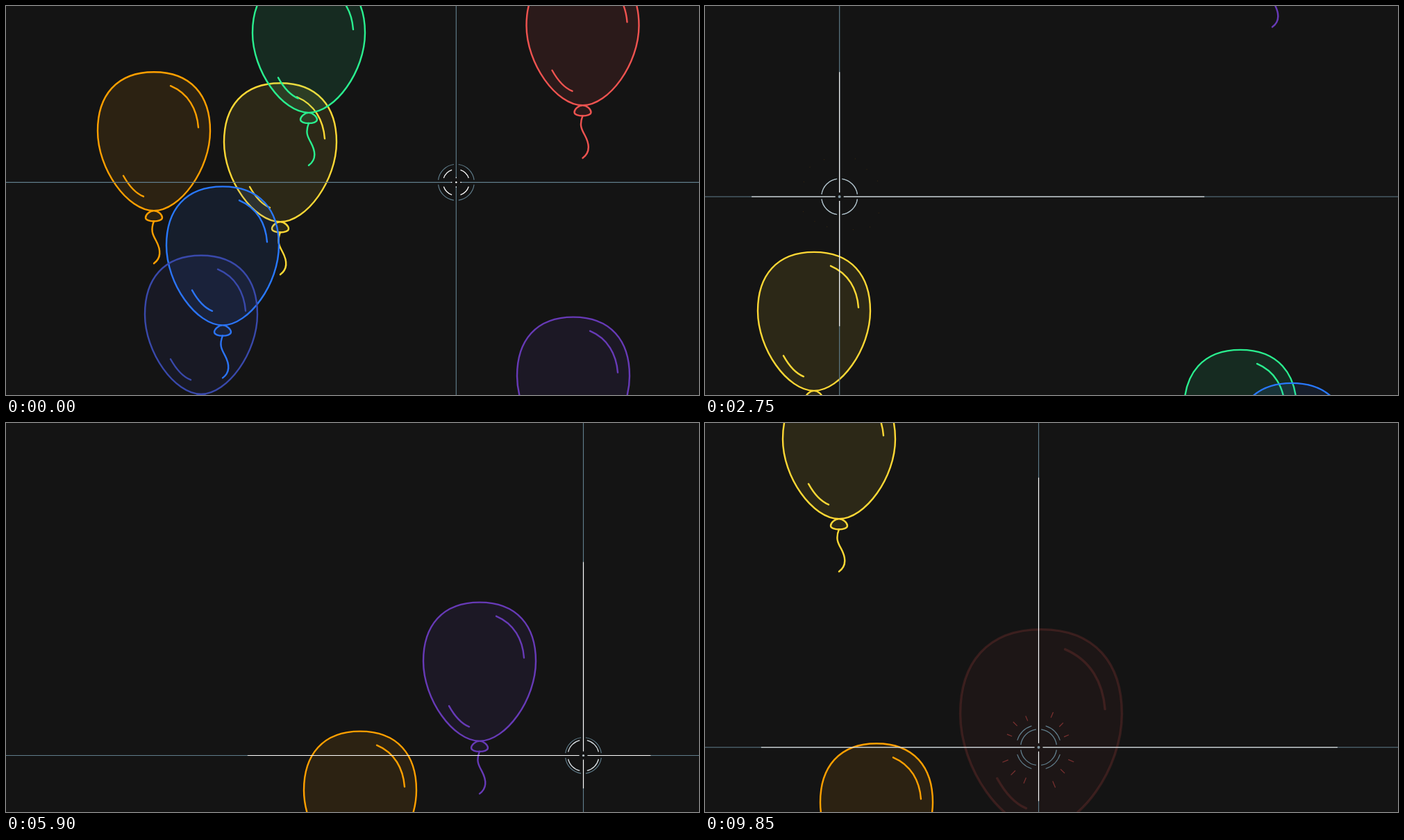
Recreate the animation shown at these times as an HTML page with a canvas. Size 998 by 561 pixels, loop 9920 ms.

```html
<!DOCTYPE html>
<html lang="en">
<head>
<meta charset="utf-8">
<title>Balloon range</title>
<style>
  html, body { margin: 0; width: 100%; height: 100%; overflow: hidden; background: #141414; }
  canvas { display: block; }
</style>
</head>
<body>
<canvas id="stage" width="998" height="561"></canvas>
<script>
const W = 998, H = 561, LOOP = 9.92, RISE = 175, SHOT_GAP = .5;
const ctx = document.getElementById('stage').getContext('2d');
const SLATE = [96, 125, 139], WHITE = [255, 255, 255];
const COLORS = ['#ef5350', '#ffa000', '#fdd835', '#2aef8f', '#2979ff', '#3949ab', '#673ab7'];

// Balloon origin: top centre of the body
const BODY = new Path2D('M0 0C54 0 81 34 81 85C81 140 38 200 0 200C-38 200-81 140-81 85C-81 34-54 0 0 0Z' +
  'M0 200C-6 200-12 206-12 210C-12 217 12 217 12 210C12 206 6 200 0 200Z');
const DETAIL = new Path2D('M24 20C50 31 62 54 64 80M-44 149.500Q-31 173-15 179.500' +
  'M0 215C-5 228-2 234 3 243C10 256 11 268 0 276');

const balloon = ([x, enter, speed = RISE]) => ({ x, enter, speed, popAt: Infinity });
const topAt = (b, t) => H - (t - b.enter) * b.speed;

// Balloons are [x, time of entry at the bottom edge, speed]
const escaping = [
  [830.5, -4.05, 152.5], [213, -3.35, 139], [436, -2.38, 255],
  [817, -.444, 252.5], [193, 6.03, 163], [247, 9.287]
].map(balloon);

// In the order in which they are shot
const targets = [
  [395, -2.569], [312, -1.717], [281, -.993, 202.5], [621.5, .16], [193.5, .84], [157, 1.573],
  [771, 2.379], [845, 2.653], [383, 3.579], [831.5, 4.613], [682, 4.173], [510, 5.236],
  [415.5, 6.47], [400, 7.2], [337, 8.119], [375, 8.276], [484, 8.59]
].map(balloon);

const balloons = [...escaping, ...targets].sort((a, b) => a.enter - b.enter);
balloons.forEach((b, i) => b.color = COLORS[i % COLORS.length]);

// Fixed aims: shot index, time, x, y; a fractional index is a rest without a shot
const AIMS = [
  [-.6, 0, 648.3, 254.3], [1, .7, 346.5, 161.4], [4, 2.543, 193.7, 275], [7.2, 4.75, 530.5, 374],
  [10, 6.74, 643.5, 298.3], [13, 8.442, 389, 438.7], [16, 9.75, 480.5, 467.7]
];

// All other shots follow at a steady pace and aim at the middle of their balloon
const stops = AIMS.map(([index, time, x, y]) => ({ index, time, x, y, target: targets[index] }));
targets.forEach((target, index) => {
  if (stops.some(s => s.index === index)) return;
  const [from, start] = AIMS.findLast(a => a[0] < index);
  const time = start + (index - from) * SHOT_GAP;
  stops.push({ index, time, x: target.x, y: topAt(target, time) + 100, target });
});
stops.sort((a, b) => a.time - b.time);
stops.forEach(s => { if (s.target) s.target.popAt = s.time; });

const clamp = v => Math.max(0, Math.min(1, v));
const lerp = (a, b, k) => a + (b - a) * k;
const mix = (a, b, k) => `rgb(${a.map((v, i) => Math.round(lerp(v, b[i], k)))})`;
const noise = n => { const s = Math.sin(n * 127.1) * 43758.5; return s - Math.floor(s); };

function line(x1, y1, x2, y2) {
  ctx.beginPath();
  ctx.moveTo(x1, y1);
  ctx.lineTo(x2, y2);
  ctx.stroke();
}

function drawBalloon(b, t) {
  const pop = clamp((t - b.popAt) / .12);
  const y = topAt(b, Math.min(t, b.popAt));
  if (pop === 1 || y > H + 5 || y < -290) return;
  const scale = 1 + .52 * pop;
  ctx.save();
  ctx.translate(b.x, y + 138);
  ctx.scale(scale, scale);
  ctx.translate(0, -138);
  ctx.fillStyle = ctx.strokeStyle = b.color;
  ctx.lineWidth = 2.4;
  ctx.lineCap = ctx.lineJoin = 'round';
  ctx.globalAlpha = .1 * Math.sqrt(1 - pop);
  ctx.fill(BODY);
  ctx.globalAlpha = 1 - pop;
  ctx.stroke(BODY);
  ctx.stroke(DETAIL);
  ctx.restore();
}

function drawSparks({ x, y, index, target }, age) {
  if (age > .23) return;
  const p = clamp(age / .12);
  ctx.save();
  ctx.strokeStyle = target.color;
  ctx.globalAlpha = p < 1 ? .45 : .14;
  ctx.lineWidth = 1.2;
  for (let i = 0; i < 16; i++) {
    if (i % 4 === 0) continue;
    const angle = i * Math.PI / 8, reach = 46 + 17 * noise(index * 16 + i);
    const from = Math.min(reach * p, reach - 1), to = reach * Math.min(1, p * 1.8);
    const c = Math.cos(angle), s = Math.sin(angle);
    line(x + c * from, y + s * from, x + c * to, y + s * to);
  }
  ctx.restore();
}

function drawRing(x, y, radius, gap, color, width) {
  ctx.strokeStyle = color;
  ctx.lineWidth = width;
  for (let i = 0; i < 4; i++) {
    const start = i * Math.PI / 2;
    ctx.beginPath();
    ctx.arc(x, y, radius, start + gap, start + Math.PI / 2 - gap);
    ctx.stroke();
  }
}

function drawCrosshair(x, y, age) {
  const slate = mix(SLATE, WHITE, 0);
  const flash = clamp(1 - age / .6);
  ctx.lineWidth = 1.15;
  for (const [ex, ey] of [[0, y], [W, y], [x, 0], [x, H]]) {
    const length = Math.hypot(ex - x, ey - y) || 1;
    const ux = (ex - x) / length, uy = (ey - y) / length;
    const ray = (to, color) => {
      ctx.strokeStyle = color;
      line(x + ux * 6, y + uy * 6, x + ux * to, y + uy * to);
    };
    ray(length, slate);
    ray(Math.max(7.5, length * flash), '#fff');
  }

  // The outer ring settles first, then the inner one
  const outer = Math.min(clamp(age / .09), clamp((.19 - age) / .09));
  const inner = Math.min(clamp(age / .06), clamp((.295 - age) / .088));
  const tint = inner * lerp(.5, 1, clamp((.2 - age) / .05));
  drawRing(x, y, lerp(26, 32.5, outer), lerp(.13, .32, outer), slate, 1.15);
  drawRing(x, y, lerp(19, 26, inner), lerp(.33, .14, inner), mix(WHITE, SLATE, tint), 1.3);

  ctx.fillStyle = mix(WHITE, SLATE, inner * .8);
  ctx.beginPath();
  ctx.arc(x, y, lerp(1.2, 2, inner), 0, 7);
  ctx.fill();
}

function draw(t) {
  ctx.fillStyle = '#141414';
  ctx.fillRect(0, 0, W, H);
  balloons.forEach(b => drawBalloon(b, t));

  const i = stops.findLastIndex(s => s.time <= t);
  const stop = stops[i], next = stops[i + 1] || { ...stop, time: LOOP + 1 };
  const age = stop.target ? t - stop.time : Infinity;
  const leave = stop.time + (stop.target ? .25 : .03);
  const ease = .5 - Math.cos(clamp((t - leave) / (next.time - leave)) * Math.PI) / 2;
  if (stop.target) drawSparks(stop, age);
  drawCrosshair(lerp(stop.x, next.x, ease), lerp(stop.y, next.y, ease), age);
}

const startTime = performance.now();
function tick() {
  draw((performance.now() - startTime) / 1000 % LOOP);
  requestAnimationFrame(tick);
}
tick();
</script>
</body>
</html>
```
